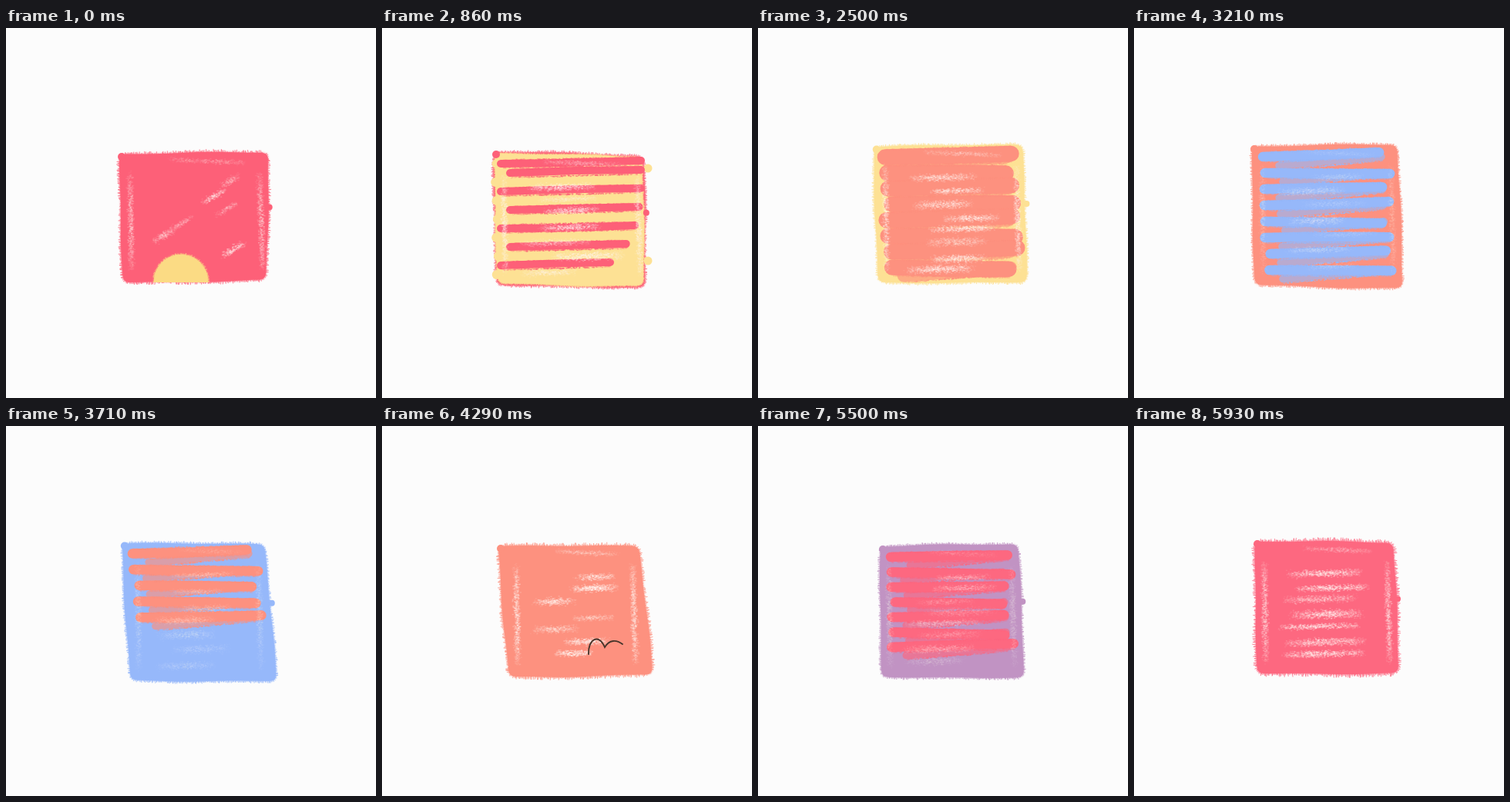
Animation, 480 px wide and 480 px high, one loop 6000 ms. Source, as an HTML page with a canvas:

```html
<!DOCTYPE html>
<html lang="en">
<head>
<meta charset="utf-8">
<title>Crayon square</title>
<style>
  html, body { margin: 0; width: 100%; height: 100%; overflow: hidden; background: #fcfcfc; }
  canvas { display: block; width: 480px; height: 480px; }
</style>
</head>
<body>
<canvas id="stage" width="480" height="480"></canvas>
<script>
const ctx = document.getElementById('stage').getContext('2d');
const LOOP = 6000, STEPS = 84;
const PAPER = '#fcfcfc', INK = '#46352b', SUN = '#fbdb84';

// Key corners, clockwise from top left.
const poses = [
  { at: 0, quad: [147,164, 340,162, 337,326, 152,330] },
  { at: 12, quad: [145,161, 339,167, 341,336, 149,333] },
  { at: 25, quad: [146,153, 343,151, 345,326, 154,328] },
  { at: 45, quad: [153,154, 341,152, 348,337, 157,333] },
  { at: 60, quad: [151,156, 333,156, 351,322, 165,325] },
  { at: 69, quad: [156,161, 336,157, 345,330, 167,328] },
  { at: 83, quad: [157,150, 336,152, 343,320, 160,321] }
];

// Each colour scribbles over the one before it. Thin spots: strength, reach across the square, slant.
const acts = [
  { from: -8, to: -1, color: '#fd6078', hair: 4, thin: .25, reach: .2, slant: .6 },
  { from: 9, to: 16, color: '#fde194', hair: .8, thin: .3, reach: .6, gapInset: 0 },
  { from: 29, to: 36, color: '#fd917f', hair: 3, thin: .3, reach: .6 },
  { from: 41, to: 49, color: '#96b8fa', hair: 3, thin: .1, reach: .6 },
  { from: 51, to: 57, color: '#fd917f', hair: 4, thin: .35, reach: .5 },
  { from: 64, to: 70, color: '#c193c3', hair: 3, thin: .12, reach: .7, gapInset: 30 },
  { from: 75, to: 81, color: '#fd6880', hair: 4.5, thin: .3, reach: .8 }
];

let seed = 1;
function rand() {
  seed = (seed + 0x6D2B79F5) | 0;
  let t = Math.imul(seed ^ (seed >>> 15), 1 | seed);
  t = (t + Math.imul(t ^ (t >>> 7), 61 | t)) ^ t;
  return ((t ^ (t >>> 14)) >>> 0) / 4294967296;
}
const spread = n => (rand() - .5) * 2 * n;
const gauss = () => rand() + rand() + rand() - 1.5;
const mix = (a, b, t) => a + (b - a) * t;
const clamp = t => Math.max(0, Math.min(1, t));

function quadAt(k) {
  const i = poses.findLastIndex(p => p.at <= k);
  const a = poses[i], b = poses[Math.min(i + 1, poses.length - 1)];
  const u = a === b ? 0 : (k - a.at) / (b.at - a.at);
  const loose = Math.min(1, 6 * u * (1 - u));
  return a.quad.map((v, j) => mix(v, b.quad[j], u) + spread(3 * loose));
}

function outline(q) {
  const pts = [], phase = rand() * 6, round = 9;
  const corner = i => ({ x: q[(i % 4) * 2], y: q[(i % 4) * 2 + 1] });
  for (let i = 0; i < 4; i++) {
    const a = corner(i), b = corner(i + 1), c = corner(i + 2);
    const len = Math.hypot(b.x - a.x, b.y - a.y), next = Math.hypot(c.x - b.x, c.y - b.y);
    const nx = (b.y - a.y) / len, ny = (a.x - b.x) / len;
    for (let d = round; d < len - round; d += 1.4) {
      const t = d / len, bow = (1 + Math.sin(t * 7 + phase + i)) * Math.sin(Math.PI * t);
      pts.push({ x: mix(a.x, b.x, t) + nx * bow, y: mix(a.y, b.y, t) + ny * bow, nx, ny });
    }
    const mx = (c.y - b.y) / next, my = (b.x - c.x) / next;
    const s = { x: mix(b.x, a.x, round / len), y: mix(b.y, a.y, round / len) };
    const e = { x: mix(b.x, c.x, round / next), y: mix(b.y, c.y, round / next) };
    for (let t = 0; t < 1; t += .1) {
      pts.push({
        x: mix(mix(s.x, b.x, t), mix(b.x, e.x, t), t), y: mix(mix(s.y, b.y, t), mix(b.y, e.y, t), t),
        nx: mix(nx, mx, t), ny: mix(ny, my, t)
      });
    }
  }
  return pts;
}

function ring(x, y, r) {
  const pts = [];
  for (let a = 0; a < Math.PI * 2; a += 1.3 / r) {
    const nx = Math.cos(a), ny = Math.sin(a);
    pts.push({ x: x + nx * r, y: y + ny * r, nx, ny });
  }
  return pts;
}

function fuzzy(pts, color, hair) {
  ctx.save();
  ctx.fillStyle = ctx.strokeStyle = ctx.shadowColor = color;
  ctx.shadowBlur = 3;
  ctx.beginPath();
  pts.forEach(p => ctx.lineTo(p.x, p.y));
  ctx.fill();
  ctx.shadowBlur = 0;
  ctx.lineWidth = .8;
  ctx.beginPath();
  pts.forEach(p => {
    const out = rand() * hair, lean = spread(1);
    ctx.moveTo(p.x - p.nx, p.y - p.ny);
    ctx.lineTo(p.x + p.nx * out - p.ny * lean, p.y + p.ny * out + p.nx * lean);
  });
  ctx.stroke();
  ctx.restore();
}

function dot(x, y, r, color) {
  ctx.fillStyle = color;
  ctx.beginPath();
  ctx.arc(x, y, r, 0, 7);
  ctx.fill();
}

function grain(x1, y1, x2, y2, w, alpha, color) {
  const len = Math.hypot(x2 - x1, y2 - y1) + w;
  ctx.save();
  ctx.fillStyle = color;
  for (let n = len * w; n > 0; n--) {
    const t = rand();
    ctx.globalAlpha = alpha * (.25 + .6 * Math.sin(Math.PI * t));
    ctx.fillRect(mix(x1, x2, t) + gauss() * w * .8, mix(y1, y2, t) + gauss() * w * .8, 2, 1.3);
  }
  ctx.restore();
}

function stroke(x1, y1, x2, y2, w, color) {
  ctx.strokeStyle = color;
  ctx.lineCap = 'round';
  ctx.lineWidth = w;
  ctx.beginPath();
  ctx.moveTo(x1, y1);
  ctx.quadraticCurveTo((x1 + x2) / 2, (y1 + y2) / 2 + spread(2), x2, y2);
  ctx.stroke();
  for (const side of [-.5, .5]) grain(x1, y1 + side * w, x2, y2 + side * w, 1.2, .7, color);
}

// Firm passes to the right, lighter ones back.
function scribble(q, part, w, color) {
  const rows = 8, gap = (q[7] - q[1] - 32) / (rows - 1);
  for (let i = 0; i < Math.ceil(part * rows); i++) {
    const y = q[1] + 13 + i * gap, left = mix(q[0], q[6], i / rows), right = mix(q[2], q[4], i / rows);
    ctx.globalAlpha = .65;
    stroke(right - 20, y, left + 35 + spread(6), y + gap * .55, w * .75, color);
    ctx.globalAlpha = 1;
    stroke(left + 17 + spread(4), y, right - 16 + spread(7), y + spread(5) - 1, w, color);
  }
}

function leftovers(inset, w, color) {
  for (let i = 0; i < 7; i++) {
    const y = Math.max(176, 164 + 24 * i);
    const x1 = 158 + inset + (i % 2 ? 8 : -4), x2 = 336 - inset - 40 * (i / 6) ** 4;
    stroke(x1, y, x2, y - 4, w, color);
  }
}

function strokeEnds(color) {
  for (let i = 0; i < 7; i++) {
    dot(149 + spread(2), 176 + 24 * i, 6, color);
    if (i % 5 === 0) dot(345, 182 + 24 * i, 5.5, color);
  }
}

function paintSquare(act, under, p, q) {
  if (p >= 1) {
    fuzzy(outline(q), act.color, act.hair);
  } else {
    fuzzy(outline(q), under.color, 3);
    if (act.gapInset >= 0 && p >= .45) {
      fuzzy(outline(q.map(v => v + (v < 240 ? 1.5 : -2))), act.color, 1.5);
      if (!act.gapInset) strokeEnds(act.color);
      leftovers(act.gapInset, 20 * (1 - p), under.color);
    } else {
      scribble(q, clamp(p / .5), 12.5 + 26 * Math.max(0, p - .56), act.color);
    }
  }
  const top = p < 1 ? under : act;
  dot(q[0] + 3, q[1] + 3, 5, top.color);
  if (rand() < .5) dot(mix(q[2], q[4], .43) + 3, mix(q[3], q[5], .43), 4, top.color);
}

function thinSpots({ thin, reach, slant = .03 }, q) {
  const l = Math.max(q[0], q[6]) + 10, r = Math.min(q[2], q[4]) - 9;
  const t = Math.max(q[1], q[3]) + 10, b = Math.min(q[5], q[7]) - 15;
  const light = (x1, y1, x2, y2, w, a) => grain(x1, y1, x2, y2, w, a * thin, '#fff6f2');
  light(l - 2, t + 15, l, b, 5, .9);
  light(r, t + 15, r + 4, b, 5, .9);
  light(l + 50, t - 4, r - 20, t, 4, .5);
  for (let y = t + 30; y < b; y += 13 + rand() * 9) {
    const len = (r - l - 36) * reach * (.8 + rand() * .3);
    const x = mix(l + 18, r - 18 - len, rand());
    light(x, y, x + len, y - len * slant, 4 + rand() * 3, .6 + rand() * .8);
  }
}

function inkLine(path, length) {
  ctx.save();
  ctx.strokeStyle = INK;
  ctx.lineCap = 'round';
  ctx.lineWidth = 1.9;
  ctx.setLineDash([length, 400]);
  ctx.stroke(new Path2D(path));
  ctx.restore();
}

const heart = 'M215 202C199 197 187 187 187 177C187 165 202 163 204 177' +
  'C207 161 219 160 223 175C226 184 226 193 226 202C223 209 219 207 215 202';
const bird = 'M268 296C267 277 281 268 289 287C295 277 304 277 312 283';

function paint(k) {
  seed = 977 * (k + 3);
  ctx.fillStyle = PAPER;
  ctx.fillRect(0, 0, 480, 480);

  const q = quadAt(k);
  const i = acts.findLastIndex(a => a.from <= k);
  const act = acts[i], under = acts[Math.max(0, i - 1)];
  const p = clamp((k - act.from + 1) / (act.to - act.from + 1));
  paintSquare(act, under, p, q);
  thinSpots(p < .45 ? under : act, q);

  if (k < 10) {
    ctx.save();
    ctx.beginPath();
    ctx.rect(0, 0, 480, 330);
    ctx.clip();
    fuzzy(ring(227, 329 - k * 6, 35), SUN, 2.5);
    ctx.restore();
  }
  if (k >= 20 && k < 30) inkLine(heart, 23 * (k - 19));
  if (k >= 58 && k < 65) inkLine(bird, 25 * (k - 57));
  if (k >= 67 && k < 76) fuzzy(ring(226, 285 - (k - 69) * 4, 22), '#fafafa', 2.5);
}

let last = -1;
function tick() {
  // Steps land on the nearest 10 ms.
  const k = Math.floor((performance.now() + 5) % LOOP / LOOP * STEPS);
  if (k !== last) paint(last = k);
  requestAnimationFrame(tick);
}
tick();
</script>
</body>
</html>
```
